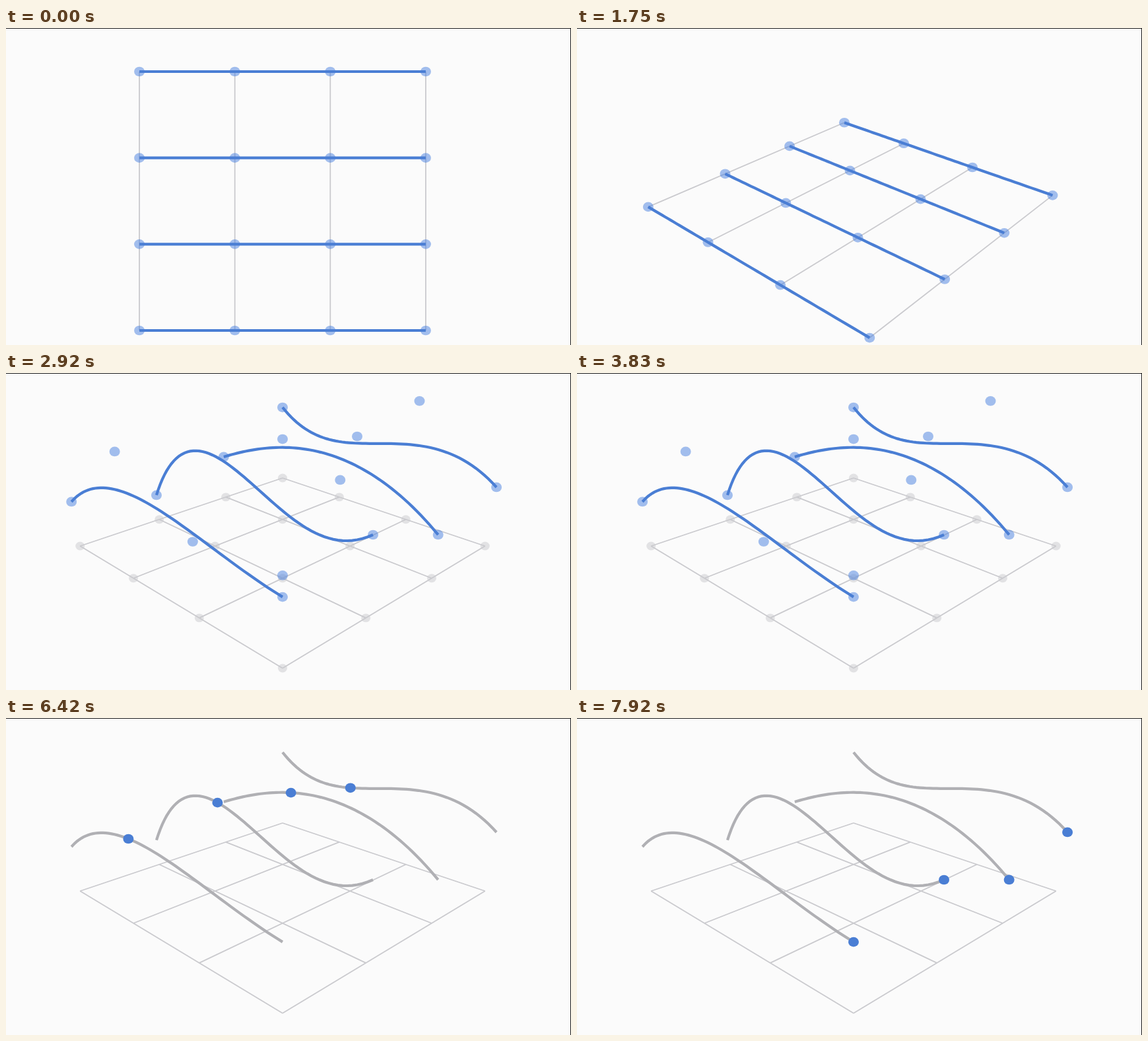
Recreate the animation shown at these times as an HTML page with a canvas. Size 856x480 px, loop 8000 ms.

```html
<!DOCTYPE html>
<html>
<head>
<meta charset="utf-8">
<style>
  html, body { margin: 0; height: 100%; overflow: hidden; background: #fbfbfb; }
  canvas { display: block; }
</style>
</head>
<body>
<canvas id="stage" width="856" height="480"></canvas>
<script>
const ctx = document.getElementById("stage").getContext("2d");
const LOOP = 8000;
const CENTER = { x: 419, y: 262 };
const SCALE = { x: 144.6, y: 130.67 };
const DISTANCE = 6.547;
const TURN = Math.PI / 4;
const TILT = 61.48 * Math.PI / 180;

// Control point heights, one row per curve
const HEIGHTS = [
  [1.056, 0.252, 1.5, 0.734],
  [0.581, 1.052, 1.308, 0.513],
  [0.334, 2.205, 0.035, 0.879],
  [0.56, 1.386, 0.811, 0.707]
];
const INDEX = [0, 1, 2, 3];

const PAPER = "#fbfbfb";
const EDGE = "#1c1c1c";
const GRID = [202, 202, 206];
const BLUE = [74, 126, 212];
const GRAY = [176, 176, 180];

const rgba = (color, alpha = 1) => `rgba(${color.join()},${alpha})`;
const mix = (a, b, k) => a.map((v, i) => Math.round(v + (b[i] - v) * k));
const ease = (t, start, end) => {
  const u = Math.min(1, Math.max(0, (t - start) / (end - start)));
  return (1 - Math.cos(Math.PI * u)) / 2;
};

// Orbit camera looking at the middle of the grid
function makeCamera(progress) {
  const turn = TURN * progress, tilt = TILT * progress;
  const cosTurn = Math.cos(turn), sinTurn = Math.sin(turn);
  const cosTilt = Math.cos(tilt), sinTilt = Math.sin(tilt);
  return (col, row, height) => {
    const x = col - 1.5, z = row - 1.5;
    const side = x * cosTurn - z * sinTurn;
    const front = x * sinTurn + z * cosTurn;
    const w = 1 - (front * sinTilt + height * cosTilt) / DISTANCE;
    return [
      CENTER.x + SCALE.x * side / w,
      CENTER.y + SCALE.y * (front * cosTilt - height * sinTilt) / w
    ];
  };
}

function bezier([a, b, c, d], u) {
  const v = 1 - u;
  return a * v * v * v + 3 * b * v * v * u + 3 * c * v * u * u + d * u * u * u;
}

function polyline(points, color, width) {
  ctx.beginPath();
  points.forEach(p => ctx.lineTo(...p));
  ctx.strokeStyle = color;
  ctx.lineWidth = width;
  ctx.stroke();
}

function dot([x, y], color, size) {
  ctx.beginPath();
  ctx.ellipse(x, y, size, size * 0.92, 0, 0, 2 * Math.PI);
  ctx.fillStyle = color;
  ctx.fill();
}

function draw(t) {
  const project = makeCamera(ease(t, 997, 1911));
  const lift = ease(t, 1911, 2825);
  const fade = ease(t, 5220, 5700);
  const slide = ease(t, 5653, 7483);
  const onCurve = (row, u) => project(3 * u, row, lift * bezier(HEIGHTS[row], u));
  const eachPoint = fn => INDEX.forEach(row => INDEX.forEach(col => fn(row, col)));

  ctx.fillStyle = PAPER;
  ctx.fillRect(0, 0, 856, 480);

  for (const i of INDEX) {
    polyline([project(0, i, 0), project(3, i, 0)], rgba(GRID), 1.8);
    polyline([project(i, 0, 0), project(i, 3, 0)], rgba(GRID), 1.8);
  }
  eachPoint((row, col) =>
    dot(project(col, row, 0), rgba(GRID, 0.5 * lift * (1 - fade)), 7));
  eachPoint((row, col) =>
    dot(project(col, row, lift * HEIGHTS[row][col]), rgba([72, 128, 224], 0.5 * (1 - fade)), 8));

  const curveColor = rgba(mix(BLUE, GRAY, fade));
  for (const row of INDEX) {
    const points = Array.from({ length: 61 }, (_, i) => onCurve(row, i / 60));
    polyline(points, curveColor, 4.2);
  }
  for (const row of INDEX) dot(onCurve(row, slide), rgba(BLUE, fade), 8);

  ctx.fillStyle = EDGE;
  ctx.fillRect(0, 0, 856, 1);
  ctx.fillRect(855, 0, 1, 480);
}

function frame() {
  draw(performance.now() % LOOP);
  requestAnimationFrame(frame);
}
frame();
</script>
</body>
</html>
```
